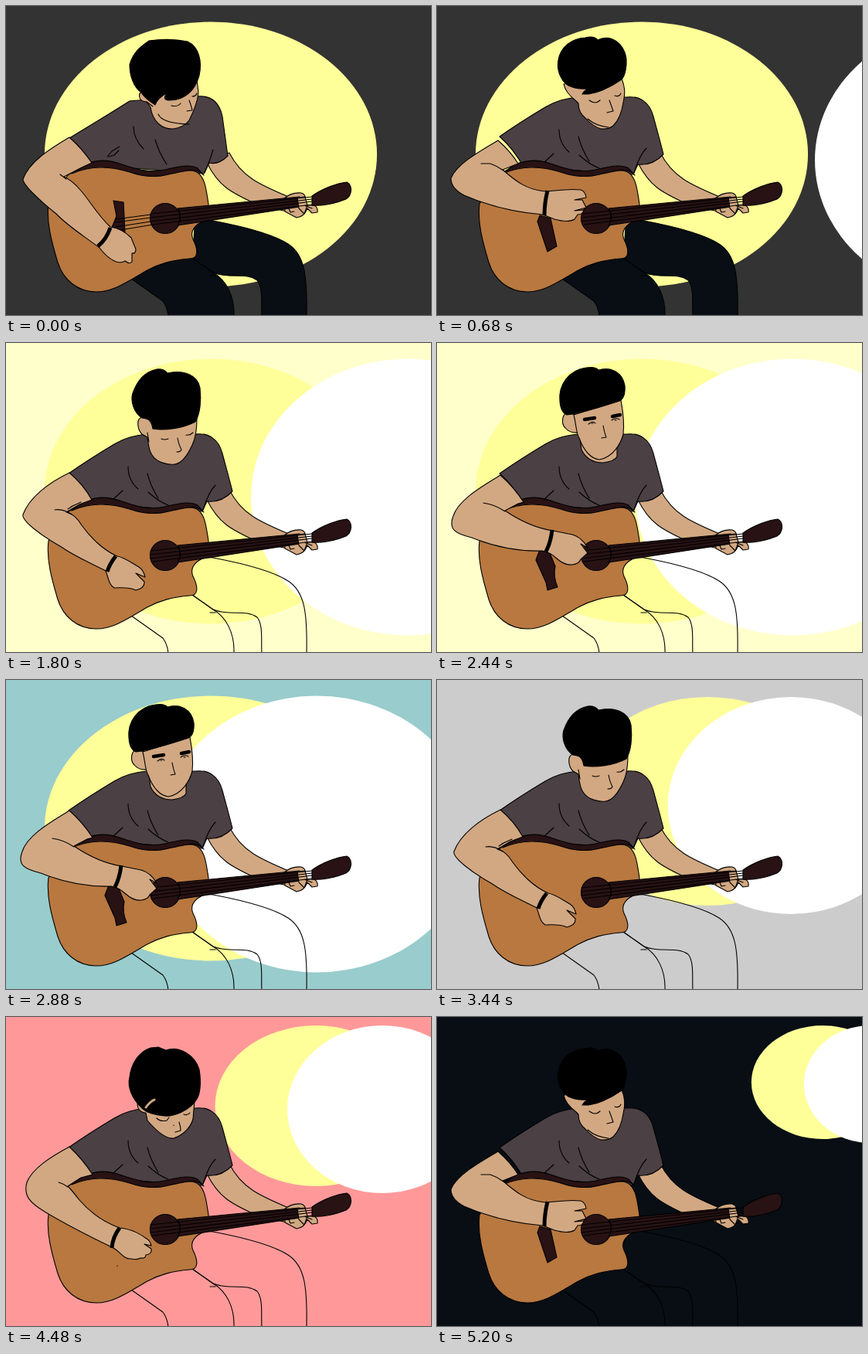
An HTML page for the animation above (5.24 s loop, 550x400 px).

```html
<!DOCTYPE html>
<html lang="en">
<head>
<meta charset="utf-8">
<title>Guitar player</title>
<style>
html, body { margin: 0; width: 100%; height: 100%; overflow: hidden; }
svg { display: block; width: 550px; height: 400px; }
path, circle { stroke: #000; stroke-width: 1.1; stroke-linejoin: round; stroke-linecap: round; }
.skin { fill: #d2a882; }
.shirt { fill: #4b4044; }
.wood { fill: #b87840; }
.dark { fill: #281214; }
.line { fill: none; }
.hair { fill: #000; }
.band { fill: none; stroke-width: 5; stroke-linecap: butt; }
.brow { fill: none; stroke-width: 4.5; }
.lock { fill: none; stroke: #d2a882; stroke-width: 3; }
</style>
</head>
<body>
<svg viewBox="0 0 550 400">
  <rect id="bg" width="550" height="400"/>
  <ellipse id="sun" fill="#ffff99"/>
  <ellipse id="moon" fill="#fff"/>
  <g id="legs">
    <path d="M162 353L203 382Q209 390 210 402L295 402C296 375 285 355 268 345L241 326L220 300"/>
    <path d="M244 276L268 278C310 286 345 295 365 308C387 322 390 350 389 402L331 402C330 385 333 365 325 355C310 344 290 354 268 345L241 326"/>
    <path class="line" d="M264 349L271 349"/>
  </g>
  <path class="skin" d="M260 203C275 233 290 241 325 257L368 267V248C330 232 305 222 289 190Z"/>
  <g id="shirt"></g>
  <g id="head"></g>
  <path class="wood" d="M80 219C95 206 120 205 140 209C165 215 180 222 200 220C220 216 235 209 247 215C258 222 259 238 262 256L261 277C247 280 237 290 242 302C249 316 249 327 238 327C215 329 200 333 183 342C160 355 140 370 117 370C92 370 74 354 67 332C59 305 52 280 55 256Z"/>
  <path class="dark" d="M85 217L100 205C120 199 130 198 150 205C170 212 185 216 205 212C222 208 238 204 248 210L256 219C245 208 235 213 215 217C195 222 180 222 160 215C135 207 110 206 85 217Z"/>
  <path class="skin" d="M360 249C366 244 372 241 382 242Q388 244 387 249L388 258L399 258Q404 261 403 267L396 268L390 262Q386 273 376 274L361 266Z"/>
  <circle class="dark" cx="206" cy="275" r="19.5"/>
  <path class="dark" d="M222 262L380 247L380 260L222 284Q229 274 222 262Z"/>
  <path class="dark" d="M396 246C410 236 430 229 441 228C449 232 448 245 440 250C425 256 408 259 396 258Z"/>
  <path class="skin" d="M377 248L387 247L390 258L386 269L379 262Z"/>
  <path class="line" d="M187 269L396 247M187 274L396 250M187 279L396 253M190 283L396 257M366 262L368 267L373 266M386 258L396 262"/>
  <g id="arm"></g>
</svg>
<script>
const $ = id => document.getElementById(id);

// Every drawing is a list of "class path" strings.
const shirts = {
  lean: [
    "shirt M172 122L160 123C135 139 105 157 82 171Q98 185 111 206L256 217L263 203Q275 206 287 194L280 143C276 124 265 115 246 117Z",
    "line M165 156Q165 172 178 185M193 173Q198 190 208 205M268 186Q263 203 257 216M131 195L137 188L147 182M133 195L140 193L146 187"
  ],
  sit: [
    "shirt M183 118C165 120 153 123 140 131C120 143 98 157 81 169Q98 184 112 208L254 218L260 205Q279 207 293 192C288 172 284 158 280 143C275 124 262 116 245 118Z",
    "line M271 184Q262 193 255 216M158 160Q158 178 171 189M183 169Q187 185 197 201M184 193Q197 205 210 210M151 191L139 202"
  ]
};

const heads = {
  a: [
    "skin M175 111C170 116 173 124 182 124L187 131C190 150 202 160 217 159Q230 157 237 148C242 138 248 125 249 112L247 95Z",
    "hair M185 45C200 43 215 42 235 46C250 53 254 72 250 90C245 108 232 123 210 122Q204 122 206 116L209 112C200 117 195 122 193 128Q180 120 175 112C165 105 160 90 160 76C165 58 178 50 185 45Z",
    "line M197 140Q202 152 237 153M237 122Q240 130 241 135L234 136M214 129Q222 131 226 126M241 117Q246 117 247 113M182 124L190 130"
  ],
  b: [
    "skin M171 107C168 117 173 124 181 124L183 134C195 148 208 158 217 157C232 152 240 140 242 132L244 108Z",
    "hair M187 40L197 39L207 43C225 37 245 50 250 68C253 85 251 100 247 106C238 122 215 129 205 128Q185 126 177 119C162 105 157 90 160 78C162 60 172 45 187 40Z",
    "lock M181 117Q186 110 192 107",
    "line M195 131Q200 136 208 134L211 130M230 126Q235 128 238 124M224 136Q226 142 226 147L219 149M217 140V140.5"
  ],
  c: [
    "skin M176 96C168 98 170 112 176 118L183 122Q185 140 189 145C195 155 210 158 218 157C228 156 235 145 241 132C246 122 247 112 247 98Z",
    "hair M195 34Q204 33 209 39C230 34 248 42 251 58C253 75 251 92 245 102C230 110 205 114 190 111C188 100 185 98 176 97C165 90 161 75 164 65C170 48 180 37 195 34Z",
    "line M201 124Q205 126 210 124M233 119Q238 120 242 116M222 123Q224 133 227 138Q226 141 221 141M183 116L185 128"
  ],
  d: [
    "skin M184 115L187 138Q195 155 215 155Q230 153 233 147L233 125Z",
    "skin M171 91C162 88 160 104 166 110Q172 117 183 116L180 93Z",
    "skin M177 93C181 110 180 117 184 123C190 140 200 150 210 151C228 148 238 130 241 118C243 100 240 85 238 74Z",
    "hair M193 32Q205 30 209 35C225 30 240 38 243 55C244 68 240 73 236 75C215 82 185 91 168 93Q160 90 159 75C157 55 170 35 193 32Z",
    "brow M191 99L204 97M227 95L237 93",
    "line M196 105Q202 100 205 104M200 104L202 104M226 100Q231 96 236 99M230 100L232 100M215 107Q217 117 219 122L213 123"
  ],
  e: [
    "skin M164 101Q166 112 180 123L183 126Q183 138 192 145Q202 156 212 159Q222 160 228 155Q238 145 241 125C244 112 243 104 239 94Z",
    "hair M192 41Q203 38 208 44C225 36 242 48 245 68C246 82 242 92 239 95C225 105 205 115 188 114Q190 110 195 107Q180 108 170 103C158 95 155 80 157 70C160 52 175 42 192 41Z",
    "line M197 122Q205 128 211 122M230 116Q236 118 238 113M223 122Q226 130 228 136L220 138M195 146Q205 155 222 157"
  ]
};

const arms = {
  a: [
    "dark M139 252L152 254L154 293L136 289L143 272Z",
    "line M142 276L187 270M142 280L187 274M142 286L187 279M142 291L190 283",
    "skin M82 170C55 186 30 202 22 224C22 232 45 253 65 269C80 285 100 297 121 313Q130 325 140 330Q148 334 154 330Q160 335 163 331L163 320Q168 321 168 315L162 300Q150 288 135 286C118 270 107 250 96 238Q86 226 75 221L98 209L111 203Q98 184 82 170Z",
    "line M70 218L78 224",
    "band M135 287Q130 302 119 311"
  ],
  b: [
    "skin M82 168C58 181 34 196 27 214C22 232 32 241 50 252C80 270 110 285 137 298C148 303 152 314 162 313Q168 315 174 312Q181 313 181 308Q189 307 188 300L179 294L188 296Q187 290 182 287C175 282 165 275 147 273C125 265 108 252 95 237Q85 224 80 219L97 208L112 204Q100 185 82 168Z",
    "line M68 214Q75 216 80 220M144 322V322.5",
    "band M147 273Q138 285 137 299"
  ],
  c: [
    "skin M82 168C55 181 30 200 22 222C20 230 45 249 70 263C90 277 110 285 129 295C133 305 133 313 140 317Q160 316 168 320Q180 317 179 309L168 298L180 303Q178 294 172 290C160 283 152 277 144 276C125 268 108 250 98 236Q90 222 78 219L95 209L111 203Q100 183 82 168Z",
    "line M63 216Q73 214 85 222M80 215L88 210M84 212L97 206",
    "band M142 276Q134 286 131 296"
  ],
  d: [
    "dark M133 266Q130 273 128 279L141 308L143 318L156 314Q150 300 153 287L146 270Z",
    "skin M82 169C60 183 28 200 21 222C14 240 25 245 45 250C75 262 105 268 136 267Q145 268 155 277Q165 286 175 285Q184 284 186 278L195 270L186 258L195 263Q186 247 170 245L150 241C130 238 110 230 88 215L105 206L112 204Q100 185 82 169Z",
    "line M60 205Q75 207 88 216",
    "band M149 240Q147 257 141 268"
  ],
  e: [
    "dark M133 271L130 279L143 318L155 311L147 275Z",
    "skin M79 174C55 188 25 205 18 223Q18 236 35 245C65 258 100 267 137 270L152 276Q170 281 178 276L182 270Q189 270 190 264L178 265L193 261L188 251L178 251L193 248Q192 240 186 238Q176 237 165 238L140 240C115 238 100 225 85 212L105 204Q95 188 79 174Z",
    "line M57 204L69 204Q78 207 86 213",
    "band M143 239Q139 255 139 271"
  ]
};

// head, arm, shirt, filled legs, arm offset
const poses = {
  start: ["a", "a", "lean", true],
  lean: ["a", "a", "lean"],
  low: ["a", "a", "sit", false, "3 -4"],
  strum: ["b", "b", "sit"],
  down: ["c", "c", "sit"],
  gaze: ["d", "d", "sit"],
  gazeLow: ["d", "d", "sit", false, "0 2"],
  lift: ["e", "d", "sit"],
  night: ["e", "e", "sit", true]
};

// Hard changes: [start in ms, value...]
const poseKeys = [
  [0, "start"], [160, "low"], [240, "strum"], [360, "lift"], [520, "strum"], [680, "night"],
  [1000, "low"], [1240, "strum"], [1440, "lean"], [1680, "down"], [1920, "gaze"],
  [2160, "gazeLow"], [2880, "gaze"], [3200, "down"], [3560, "lean"], [3840, "strum"],
  [4120, "low"], [4480, "strum"], [4840, "low"], [5200, "night"]
];
const bgKeys = [
  [0, "#333333"], [960, "#ffccff"], [1680, "#ffffcc"], [2600, "#99cccc"],
  [3440, "#cccccc"], [4120, "#ff9999"], [5200, "#080e14"]
];
// cx, cy, ry
const sunKeys = [
  [0, 265, 192, 171.5], [3440, 350, 157, 135], [4200, 401, 115, 104],
  [4600, 450, 100, 89], [5200, 499, 84.5, 73.5]
];
const moonKeys = [
  [0, 808, 199.5, 179], [520, 750, 199.5, 179], [680, 692, 199.5, 179], [800, 634, 199.5, 179],
  [1000, 576, 199.5, 179], [1800, 520, 199.5, 179], [2200, 460, 199.5, 179],
  [2640, 402, 199.5, 179], [3440, 458, 162.5, 140.5], [4200, 487, 119.5, 108.5],
  [4600, 524, 103, 92], [5200, 561, 87, 76]
];

const at = (keys, t) => keys.findLast(k => k[0] <= t);

function draw(id, parts) {
  $(id).innerHTML = parts.map(p => {
    const i = p.indexOf(" ");
    return `<path class="${p.slice(0, i)}" d="${p.slice(i + 1)}"/>`;
  }).join("");
}

function place(id, [, cx, cy, ry], ratio) {
  for (const [k, v] of Object.entries({ cx, cy, ry, rx: ry * ratio })) $(id).setAttribute(k, v);
}

let shown;
function frame() {
  const t = performance.now() % 5240;
  const name = at(poseKeys, t)[1];
  if (name !== shown) {
    const [head, arm, shirt, filled, shift = "0 0"] = poses[name];
    draw("head", heads[head]);
    draw("arm", arms[arm]);
    draw("shirt", shirts[shirt]);
    $("arm").setAttribute("transform", `translate(${shift})`);
    $("legs").setAttribute("fill", filled ? "#080e14" : "none");
    shown = name;
  }
  $("bg").setAttribute("fill", at(bgKeys, t)[1]);
  place("sun", at(sunKeys, t), 1.254);
  place("moon", at(moonKeys, t), 1.134);
  requestAnimationFrame(frame);
}
frame();
</script>
</body>
</html>
```
